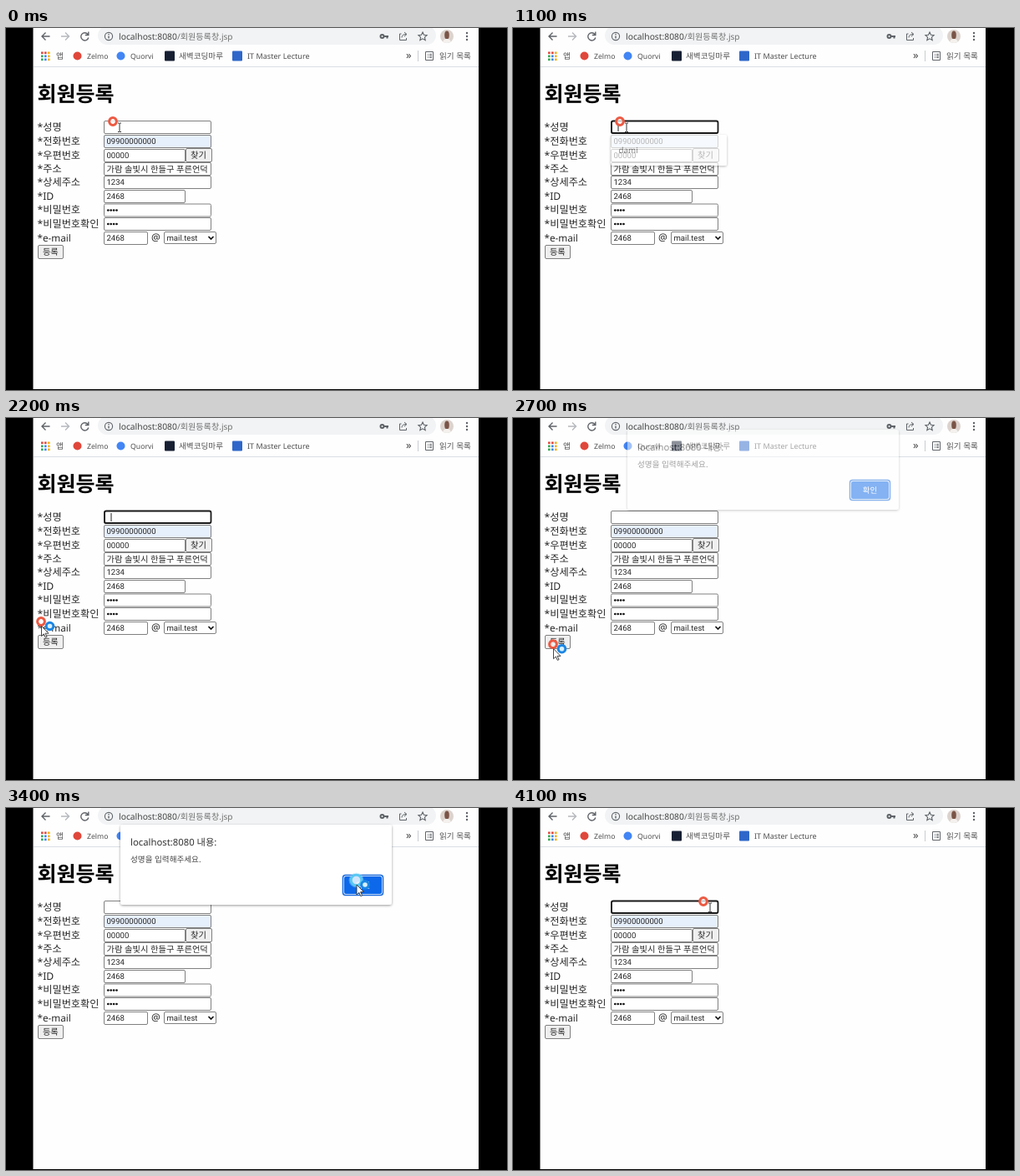
Write an HTML page that moves like this. It is 600 by 434 pixels and loops after 4200 ms.

```html
<!DOCTYPE html>
<html lang="ko">
<head>
<meta charset="utf-8">
<title>회원등록</title>
<style>
  html, body { margin: 0; width: 100%; height: 100%; overflow: hidden; background: #000; }
  svg { display: block; width: 600px; height: 434px; }
  text { font-family: "Noto Sans", "Noto Sans CJK KR", sans-serif; white-space: pre; text-rendering: geometricPrecision; }
  .field { font-family: Roboto, "Noto Sans CJK KR", sans-serif; }
  .icon { fill: none; stroke: #5f6368; stroke-width: 1.4; }
</style>
</head>
<body>
<svg id="stage" viewBox="0 0 600 434">
  <defs>
    <filter id="shadow" x="-10%" y="-20%" width="120%" height="150%">
      <feDropShadow dx="0" dy="1" stdDeviation="1.6" flood-opacity=".4"/>
    </filter>
    <clipPath id="avatarClip"><circle cx="528" cy="10" r="8"/></clipPath>
    <clipPath id="addressClip"><rect x="118" y="162" width="126" height="15"/></clipPath>
  </defs>
  <rect x="32.500" width="533.500" height="433" fill="#fefefe"/>

  <g id="browser">
    <rect x="110" y="-2" width="405" height="22" rx="11" fill="#f1f3f4"/>
    <path d="M33 46.5H566" stroke="#dadfe6"/>
    <path class="icon" d="M52.5 10H43M47.500 5.500 43 10l4.500 4.500"/>
    <path class="icon" d="M66 10h9.500M71 5.500 75.500 10 71 14.500" style="stroke:#b5b8bc"/>
    <path class="icon" d="M98 7.500A4.600 4.600 0 1 0 98.800 11.500M98.800 4.500V8.500H94.800"/>
    <circle class="icon" cx="123" cy="10" r="4.600" style="stroke-width:1.1"/>
    <path class="icon" d="M123 9.500v3M123 7v1.200"/>
    <circle class="icon" cx="450.500" cy="10" r="2" style="stroke-width:2"/>
    <path class="icon" d="M453 10h5M456.500 10v2.500" style="stroke-width:2"/>
    <path class="icon" d="M473.500 7H471.500v7.500h8V12M474 11.500q0-4 5-4M477 5l3 2.500-3 2.500" style="stroke-width:1"/>
    <path class="icon" d="m499 5 1.500 3.300 3.600.4-2.700 2.400.8 3.600-3.200-1.900-3.200 1.900.8-3.600-2.700-2.400 3.600-.4Z" style="stroke-width:1.1"/>
    <g clip-path="url(#avatarClip)">
      <rect x="520" y="2" width="16" height="16" fill="#dcd3ce"/>
      <ellipse cx="528" cy="8.500" rx="2.800" ry="5" fill="#7a5547"/>
      <path d="M523 19q0-6 5-6t5 6" fill="#f4f1ee"/>
    </g>
    <g fill="#5f6368"><circle cx="552" cy="6" r="1.200"/><circle cx="552" cy="10" r="1.200"/><circle cx="552" cy="14" r="1.200"/></g>
    <g id="apps"></g>
    <circle cx="85.500" cy="33.500" r="5" fill="#e0473b"/>
    <circle cx="137.500" cy="33.500" r="5" fill="#4285f4"/>
    <rect x="190" y="27.500" width="12" height="12" rx="1" fill="#172033"/>
    <rect x="271" y="27.500" width="12" height="12" rx="1" fill="#2e67c9"/>
    <path d="M493.500 27v13" stroke="#c8ccd0"/>
    <path class="icon" d="M502.500 28.500h9v10h-9ZM505 31.500h1M507 31.500h3M505 33.500h1M507 33.500h3M505 35.500h1M507 35.500h3" style="stroke-width:1"/>
  </g>

  <g id="form"></g>
  <rect id="focus" x="118" y="111.500" width="127.500" height="14.500" rx="2" fill="none" stroke="#181818" stroke-width="1.800"/>
  <path id="caret" d="M.5 114V124" stroke="#222"/>

  <g id="suggestion">
    <rect x="117" y="128" width="139" height="37" rx="2" fill="#fff" filter="url(#shadow)"/>
  </g>

  <g id="dialog">
    <rect x="137" y="20" width="325" height="96" rx="3" fill="#fff" filter="url(#shadow)"/>
    <rect id="okRing" x="403.500" y="80.500" width="48" height="24" rx="3" fill="#fff" stroke="#1768dc" stroke-width="1.500"/>
    <rect id="okButton" x="405" y="82" width="45" height="21" rx="2"/>
  </g>

  <g id="pointer">
    <circle id="halo" r="9" fill="#9fe0fa" opacity=".4"/>
    <circle id="ring" fill="#fff" fill-opacity=".75" stroke-width="3"/>
    <path id="beam" d="M6 2h1.500l.5.5.5-.5H10M8 2.500V12M6 12.500h1.500L8 12l.5.500H10" fill="none" stroke="#333"/>
    <path id="arrow" d="M.5 5.500V17.500l2.800-2.600 2 4.300 1.800-.8-2-4.200h3.900Z" fill="#fff" stroke="#333" stroke-width=".9"/>
    <circle id="busy" cx="10.500" cy="5.500" r="4.300" fill="#d9f1ff" stroke="#1c86e3" stroke-width="3"/>
  </g>
</svg>
<script>
const LOOP = 4200, TICK = 100;
const $ = id => document.getElementById(id);

function add(parent, tag, attrs, content = '') {
  const node = document.createElementNS('http://www.w3.org/2000/svg', tag);
  for (const key in attrs) node.setAttribute(key, attrs[key]);
  node.textContent = content;
  return $(parent).appendChild(node);
}
const label = (parent, x, y, size, content, attrs = {}) =>
  add(parent, 'text', { x, y, 'font-size': size, fill: '#262626', ...attrs }, content);

function box(x, y, w, h, attrs = {}) {
  add('form', 'rect', { x: x + .5, y: y + .5, width: w - 1, height: h - 1, rx: 1.5,
    fill: '#fff', stroke: '#808080', ...attrs });
}
const fieldText = (x, y, content, attrs = {}) =>
  label('form', x, y, 9.55, content, { class: 'field', ...attrs });

// Toolbar and bookmarks
label('browser', 135, 13.7, 10.3, 'localhost:8080', { fill: '#444' });
label('browser', 205, 13.7, 10.1, '/회원등록창.jsp', { fill: '#707070' });
const bookmarks = [[60, 9.6, '앱'], [97, 8.7, 'Zelmo'], [149, 8.7, 'Quorvi'],
  [207, 9.6, '새벽코딩마루'], [289, 9.1, 'IT Master Lecture'], [519, 9.6, '읽기 목록']];
for (const [x, size, name] of bookmarks) label('browser', x, 36.8, size, name, { fill: '#505050' });
label('browser', 479, 37, 13, '»', { fill: '#444' });
const dotColors = ['#e5483b', '#e5483b', '#f2b31c', '#35a853', '#4285f4', '#f2b31c', '#35a853', '#4285f4', '#f2b31c'];
dotColors.forEach((fill, i) => add('apps', 'rect',
  { x: 42 + i % 3 * 4, y: 28.5 + Math.floor(i / 3) * 4, width: 2.6, height: 2.6, fill }));

// Form
label('form', 37.5, 88, 25, '회원등록', { 'font-weight': 700, fill: '#000' });
const rows = [
  ['성명', 111, 129, ''],
  ['전화번호', 128, 129, '09900000000'],
  ['우편번호', 145, 98, '00000'],
  ['주소', 161, 129, ''],
  ['상세주소', 177, 129, '1234'],
  ['ID', 194, 98, '2468'],
  ['비밀번호', 210.5, 129, '*'],
  ['비밀번호확인', 227, 129, '*'],
  ['e-mail', 244, 53, '2468']
];
rows.forEach(([name, y, width, value], i) => {
  label('form', 37.5, y + 11.6, i === 8 ? 11.7 : 12.2, '*' + name);
  box(117, y, width, 16, i === 1 ? { fill: '#e6effc' } : {});
  if (value === '*') {
    for (let k = 0; k < 4; k++) add('form', 'circle', { cx: 122.3 + k * 3.4, cy: y + 8, r: 1.35, fill: '#111' });
  } else fieldText(120.5, y + 11.4, value);
});
label('form', 120.5, 173, 10.3, '가람 솔빛시 한들구 푸른언덕', { class: 'field', 'clip-path': 'url(#addressClip)' });
box(215, 144, 32, 17, { fill: '#efefef' });
label('form', 221, 156.3, 10.3, '찾기');
label('form', 174, 255.3, 12, '@');
box(189, 244, 63, 15);
fieldText(192.5, 255, 'mail.test');
add('form', 'path', { d: 'M242.5 250l3 3 3-3', fill: 'none', stroke: '#111', 'stroke-width': 1.7 });
box(38, 260, 31, 17, { fill: '#efefef' });
label('form', 44, 272.2, 10.2, '등록');

// Overlays
label('suggestion', 126.5, 150, 9.8, 'dami', { fill: '#555' });
label('dialog', 149, 45, 11.3, 'localhost:8080 내용:', { fill: '#333' });
label('dialog', 149, 65, 9.6, '성명을 입력해주세요.', { fill: '#444' });
label('dialog', 427.5, 95.5, 9.5, '확인', { fill: '#fff', 'text-anchor': 'middle' });

// Keyframes: time, then values
const pointerPath = [[0, 128, 112], [1700, 128, 112], [1800, 130, 113], [2000, 92, 185], [2200, 42, 244],
  [2300, 43, 258], [2400, 48, 270], [2900, 48, 272], [3000, 346, 170], [3300, 418, 88],
  [3500, 421, 85], [3600, 304, 111], [3900, 240, 112], [4100, 228, 112]];
const suggestionFade = [[400, 0], [500, .4], [600, .84], [700, 1], [1000, 1], [1300, 0]];
const dialogMotion = [[2600, 0, -12], [2700, .5, -6], [2800, 1, 0], [3500, 1, 0], [3600, .87, -6], [3700, 0, -12]];

function sample(keys, t) {
  const next = keys.findIndex(key => key[0] > t);
  if (next === 0) return keys[0].slice(1);
  if (next < 0) return keys[keys.length - 1].slice(1);
  const a = keys[next - 1], b = keys[next], p = (t - a[0]) / (b[0] - a[0]);
  return a.slice(1).map((v, i) => v + (b[i + 1] - v) * p);
}
const within = (t, from, to) => t >= from && t < to;
const show = (id, visible) => $(id).setAttribute('visibility', visible ? 'visible' : 'hidden');
const set = (id, attrs) => { for (const key in attrs) $(id).setAttribute(key, attrs[key]); };

function draw(t) {
  const [x, y] = sample(pointerPath, t);
  set('pointer', { transform: `translate(${x} ${y})` });
  const clicking = within(t, 200, 400) || within(t, 2500, 2700) || within(t, 3400, 3700);
  set('ring', { r: clicking ? 6.3 : 4.4, stroke: clicking ? '#58c8f2' : '#ec5a43' });
  show('halo', clicking);
  const beam = t < 1900 || t >= 3900;
  show('beam', beam);
  show('arrow', !beam);
  show('busy', within(t, 2100, 3900));

  const focused = within(t, 300, 2500) || t >= 3600;
  show('focus', focused);
  show('caret', focused && t < 3900);
  set('caret', { transform: `translate(${t < 1100 ? 122 : 125.5} 0)` });

  set('suggestion', { opacity: sample(suggestionFade, t)[0] });
  const [opacity, shift] = sample(dialogMotion, t);
  set('dialog', { opacity, transform: `translate(0 ${shift})` });
  show('okRing', t < 3600);
  set('okButton', { fill: t < 3600 ? '#0d69ea' : '#1a78ee' });
}

function frame() {
  draw(Math.floor(performance.now() % LOOP / TICK) * TICK);
  requestAnimationFrame(frame);
}
frame();
</script>
</body>
</html>
```
